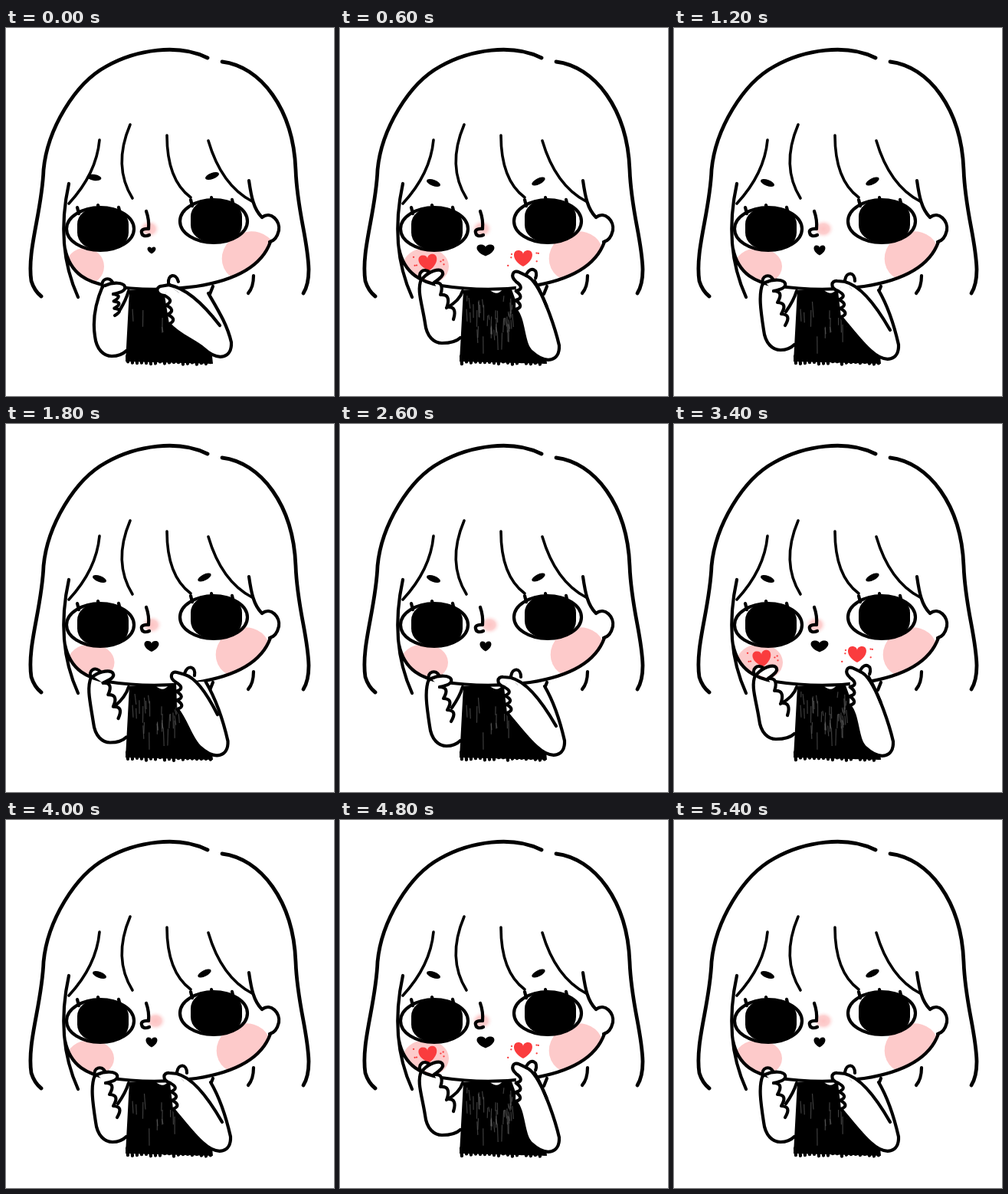
Animation of 428x480 px, one loop 5600 ms. Source, as an HTML page:

```html
<!DOCTYPE html>
<html lang="en">
<head>
<meta charset="utf-8">
<title>Finger hearts</title>
<style>
  html, body { margin: 0; width: 100%; height: 100%; overflow: hidden; background: #fff; }
  svg { display: block; width: 428px; height: 480px; overflow: hidden; }
  .line { fill: none; stroke: #000; stroke-width: 4.2; stroke-linecap: round; stroke-linejoin: round; }
  .skin { fill: #fff; }
  .thin { stroke-width: 3.6; }
  .hair { stroke-width: 4.8; }
  .blush { fill: #fdcaca; }
  .love { fill: #fa3c3e; }
  .streak { stroke: #666; stroke-width: 1.2; opacity: .6; }
  /* Seven poses stand side by side; the strip jumps one stage width per pose. */
  .strip { animation: flip 1.4s steps(7) infinite; }
  @keyframes flip { to { transform: translateX(-2996px); } }
</style>
</head>
<body>
<svg viewBox="0 0 428 480">
  <defs>
    <radialGradient id="glow">
      <stop offset="0" stop-color="#fdc3c3"/>
      <stop offset=".5" stop-color="#fdcfcf"/>
      <stop offset="1" stop-color="#fff" stop-opacity="0"/>
    </radialGradient>
    <clipPath id="face">
      <path d="M77 230V288C84 322 108 332 132 336Q190 345 248 337C300 329 334 310 345 279V230Z"/>
    </clipPath>
    <path id="heart" d="M0 .5C-.65 .1-.58-.5-.27-.5C-.1-.5 0-.38 0-.25C0-.38 .1-.5 .27-.5C.58-.5 .65 .1 0 .5Z"/>
    <g id="leftFingers" class="line">
      <path class="skin" d="M0 1C-3-10 9-14 14-4"/>
      <path class="skin" d="M3-1C14-6 27-5 29 0C31 6 23 8 14 10"/>
    </g>
    <g id="rightFingers" class="line">
      <path class="skin" d="M9-14C11-26 22-25 22-13"/>
      <path class="skin" d="M0 0C-11-4-9-14-1-13L10-12"/>
    </g>
  </defs>
  <g class="strip" id="back"></g>
  <g class="line">
    <path class="hair" d="M263 39C225 20 170 28 131 50C90 72 54 132 49 185C47 240 27 290 33 330Q37 343 46 350"/>
    <path class="hair" d="M282 44C332 50 375 105 378 185C380 240 394 275 395 315Q395 335 388 346"/>
    <path class="thin" d="M122 146Q118 190 82 229M162 126Q139 180 165 222M210 140Q210 198 241 221M264 147Q281 205 321 226"/>
    <path d="M82 203Q64 285 94 351M77 288C84 322 108 332 132 336Q190 345 248 337C300 329 334 310 345 279"/>
    <path d="M317 199C320 220 323 236 334 247C346 238 358 252 356 264Q353 277 344 279"/>
    <path d="M323 323Q323 338 316 346M270 337L266 347"/>
    <path d="M183 239Q187 250 186 262C179 261 176 264 177 267C178 272 183 272 187 270"/>
  </g>
  <g id="eyes"></g>
  <g class="strip" id="front"></g>
</svg>
<script>
const STAGE = 428;
const show = (id, html) => document.getElementById(id).innerHTML = html;
const line = (d, cls = "") => `<path class="line ${cls}" d="${d}"/>`;
const oval = (x, y, rx, ry, turn = 0, attr = "") =>
  `<ellipse cx="${x}" cy="${y}" rx="${rx}" ry="${ry}" transform="rotate(${turn} ${x} ${y})" ${attr}/>`;
const heart = (x, y, w, h, turn = 0, cls = "") =>
  `<use href="#heart" class="${cls}" transform="translate(${x} ${y}) rotate(${turn}) scale(${w} ${h})"/>`;

function random(seed) {
  return () => (seed = seed * 16807 % 2147483647) / 2147483647;
}

function eye(x, y) {
  let out = oval(x, y, 44, 28, 0, 'class="line skin"') +
    `<rect x="${x - 30}" y="${y - 28}" width="67" height="55" rx="26" ry="22"/>`;
  for (const dx of [-28, -1, 26])
    out += line(`M${x + dx - 2} ${y - 31 + Math.abs(dx) / 9}l2 8`);
  return out;
}
show("eyes", eye(123, 262) + eye(271, 252));

// Key poses; a hand is x, y and its turn in degrees.
const rest = {
  leftHand: [126, 337, 0], leftKnuckle: [142, 375], leftElbow: [116, 428], armpit: [149, 367],
  rightHand: [207, 349, -15], rightKnuckle: [213, 386], rightElbow: [294, 430],
  sleeve: [264, 346], wrist: [279, 388],
  perk: 0, mouth: [11, 9], cheek: [103, 25], nose: 187, scribble: 6
};
const lift = {
  leftHand: [116, 333, 0], leftKnuckle: [145, 388], leftElbow: [117, 420], armpit: [146, 370],
  rightHand: [214, 343, 0], rightKnuckle: [218, 377], rightElbow: [293, 433],
  sleeve: [267, 342], wrist: [282, 394],
  perk: 1, mouth: [15, 13], cheek: [110, 31], nose: 195, scribble: 14
};
const love = {
  leftHand: [106, 328, -22], leftKnuckle: [148, 380], leftElbow: [111, 411], armpit: [139, 365],
  rightHand: [230, 331, 20], rightKnuckle: [229, 367], rightElbow: [286, 434],
  sleeve: [254, 330], wrist: [270, 364],
  perk: 1, mouth: [23, 15], cheek: [112, 30], nose: 185, scribble: 45
};
const half = (a, b) => Array.isArray(a) ? a.map((v, i) => half(v, b[i])) : (a + b) / 2;
const reach = Object.fromEntries(Object.keys(lift).map(k => [k, half(lift[k], love[k])]));

// Point given in a hand's own coordinates, on the stage.
function onHand([x, y, turn], dx, dy) {
  const a = turn * Math.PI / 180;
  return [x + dx * Math.cos(a) - dy * Math.sin(a), y + dx * Math.sin(a) + dy * Math.cos(a)];
}

// Scalloped row of knuckles from a to b.
function knuckles([ax, ay], [bx, by], bulge) {
  const count = 3, dx = (bx - ax) / count, dy = (by - ay) / count;
  const len = Math.hypot(dx, dy), nx = dy / len * bulge, ny = -dx / len * bulge;
  return `q${dx * .3 + nx} ${dy * .3 + ny} ${dx} ${dy}`.repeat(count);
}
const fingers = (side, [x, y, turn]) =>
  `<use href="#${side}Fingers" transform="translate(${x} ${y}) rotate(${turn})"/>`;

function leftArm(p) {
  const [hx, hy] = p.leftHand, [ex, ey] = p.leftElbow;
  const palm = onHand(p.leftHand, 14, 10);
  return line(`M160 343Q156 356 ${p.armpit}`) +
    line(`M${hx} ${hy}C${hx - 6} ${hy + 14} ${ex - 4} ${ey - 52} ${ex} ${ey - 26}` +
      `C${ex + 2} ${ey - 8} ${ex + 12} ${ey} ${ex + 22} ${ey}Q150 ${ey} 157 ${ey - 7}`, "skin") +
    line(`M${palm}` + knuckles(palm, p.leftKnuckle, 13), "skin") +
    fingers("left", p.leftHand);
}

function rightArm(p) {
  const [hx, hy] = p.rightHand, [kx, ky] = p.rightKnuckle;
  const [ex, ey] = p.rightElbow, [sx, sy] = p.sleeve, [wx, wy] = p.wrist;
  const [bx, by] = onHand(p.rightHand, 9, -12);
  return `<path fill="#fff" d="M${hx} ${hy}L${bx} ${by}L${wx} ${wy}L${kx} ${ky}Z"/>` +
    line(`M${sx} ${sy}C${sx + 14} ${sy + 24} ${ex - 5} ${ey - 42} ${ex} ${ey - 20}` +
      `C${ex + 1} ${ey} ${ex - 16} ${ey + 6} ${ex - 36} ${ey - 12}` +
      `C${ex - 48} ${ey - 22} ${kx + 12} ${ky + 14} ${kx} ${ky}` +
      knuckles([kx, ky], [hx, hy], -12), "skin") +
    line(`M${bx} ${by}Q${bx + (wx - bx) * .45} ${by + (wy - by) * .1} ${wx} ${wy}`, "skin") +
    fingers("right", p.rightHand);
}

function shirt(scribble) {
  const rand = random(71);
  let out = '<path d="M161 342H196Q205 350 212 341H224L240 385L269 428L270 438L156 435Z"/>';
  for (let i = 0; i < scribble; i++)
    out += `<path class="streak" d="M${165 + rand() * 60} ${348 + rand() * 55}l${rand() * 3 - 1} ${6 + rand() * 18}"/>`;
  for (let x = 158; x < 270; x += 6)
    out += line(`M${x} 428l1 ${7 + rand() * 4}`);
  return out;
}

function cheekHeart(x, y, turn, seed) {
  const rand = random(seed);
  let out = heart(x, y, 24, 21, turn, "love");
  for (let i = 0; i < 6; i++) {
    const side = i % 2 ? 1 : -1;
    out += oval(x + side * (15 + rand() * 6), y - 9 + rand() * 19, 1.2, 1.1, 0, 'class="love"');
  }
  return out;
}

function backPart({ cheek: [x, rx], nose }) {
  return `<g clip-path="url(#face)">${oval(x, 311, rx, 24, 0, 'class="blush"')}` +
    `${oval(420 - x, 298, 36, 32, -25, 'class="blush"')}</g>` +
    oval(nose, 262, 15, 13, 0, 'fill="url(#glow)"');
}

function frontPart(p) {
  const k = p.perk;
  return oval(115 + 7 * k, 195 + 7 * k, 9.5, 4, 8 + 12 * k) +
    oval(269 - 10 * k, 193 + 7 * k, 9.5, 4, -20 - 7 * k) +
    heart(190, 290, ...p.mouth) + shirt(p.scribble) + leftArm(p) + rightArm(p);
}

const cycle = [
  { pose: rest }, { pose: lift }, { pose: reach },
  { pose: love, rise: 0 }, { pose: love, rise: 1.5 },
  { pose: reach }, { pose: lift }
];
const hearts = rise => cheekHeart(115, 306 - rise, -8, 5) + cheekHeart(239, 300.5 - rise, 0, 9);
const strip = draw => cycle.map((c, i) =>
  `<g transform="translate(${i * STAGE} 0)">${draw(c)}</g>`).join("");

show("back", strip(c => backPart(c.pose)));
show("front", strip(c => ("rise" in c ? hearts(c.rise) : "") + frontPart(c.pose)));
</script>
</body>
</html>
```
